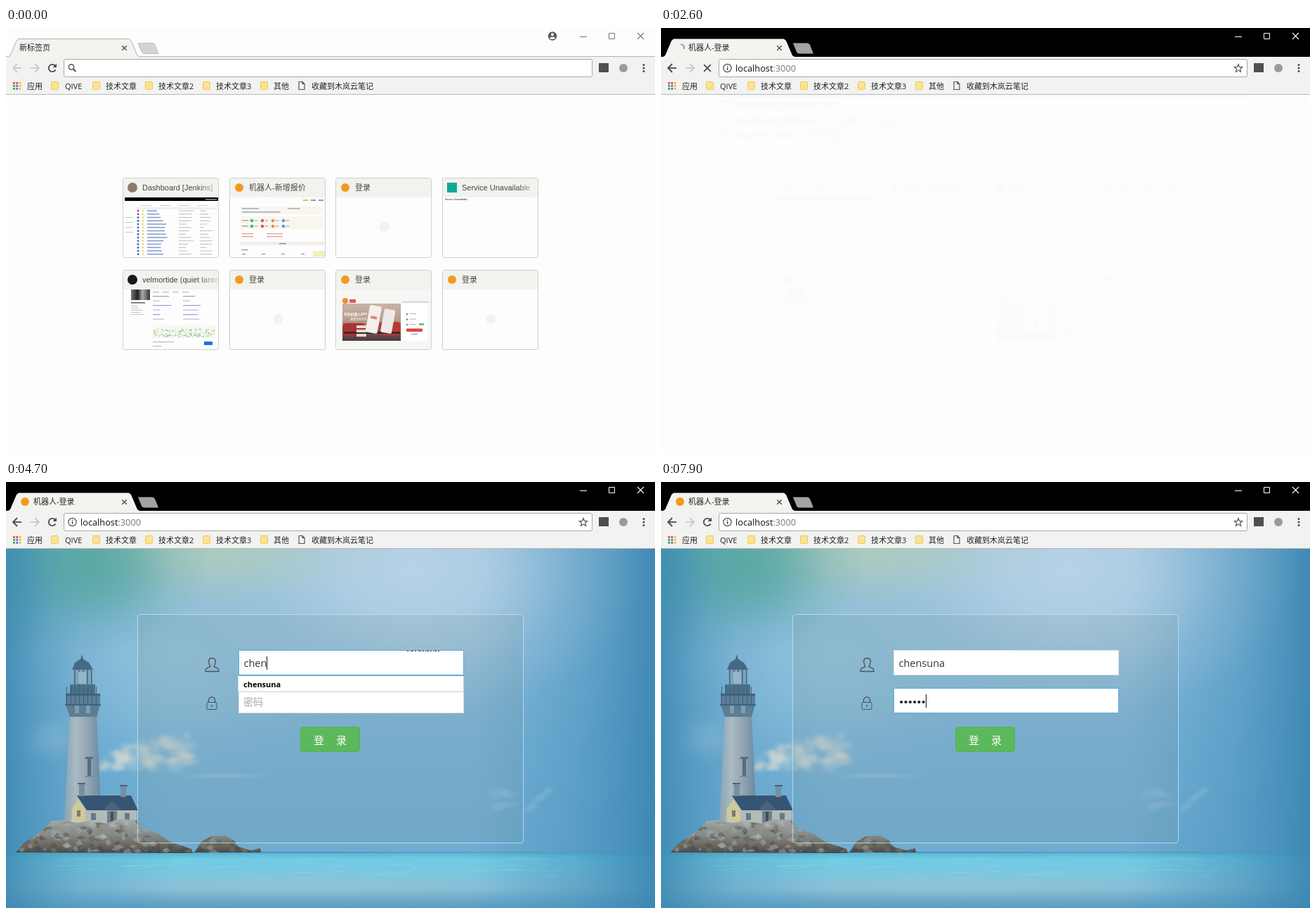
These frames come from a looping animation (924x606 px, 8000 ms). An HTML page with a canvas:

```html
<!DOCTYPE html>
<html lang="zh-CN">
<head>
<meta charset="utf-8">
<title>新标签页</title>
<style>
html, body { margin: 0; width: 100%; height: 100%; overflow: hidden; background: #fdfdfd; }
canvas { display: block; width: 924px; height: 606px; }
</style>
</head>
<body>
<canvas id="stage" width="924" height="606"></canvas>
<script>
const W = 924, H = 606, LOOP = 8000;
const stage = document.getElementById('stage').getContext('2d');
let c = stage;

const CJK = '"Noto Sans CJK SC","Noto Sans CJK JP","Noto Sans CJK",sans-serif';
const UI = '"Open Sans",' + CJK;
const ARIAL = '"Liberation Sans",Arial,' + CJK;
const USER = 'chensuna';

function rng(seed) {
  return () => (seed = (seed * 16807) % 2147483647) / 2147483647;
}
function rect(x, y, w, h, fill) { c.fillStyle = fill; c.fillRect(x, y, w, h); }
function box(x, y, w, h, r, fill, stroke) {
  c.beginPath(); c.roundRect(x, y, w, h, r);
  if (fill) { c.fillStyle = fill; c.fill(); }
  if (stroke) { c.strokeStyle = stroke; c.lineWidth = 1; c.stroke(); }
}
function disc(x, y, r, fill) {
  c.beginPath(); c.arc(x, y, r, 0, 7); c.fillStyle = fill; c.fill();
}
function trace(pts, close) {
  c.beginPath();
  for (let i = 0; i < pts.length; i += 2) c.lineTo(pts[i], pts[i + 1]);
  if (close) c.closePath();
}
function poly(fill, ...pts) { trace(pts, true); c.fillStyle = fill; c.fill(); }
function line(color, width, ...pts) {
  trace(pts); c.strokeStyle = color; c.lineWidth = width; c.stroke();
}
function arc(x, y, r, a, b, color, width) {
  c.beginPath(); c.arc(x, y, r, a, b); c.strokeStyle = color; c.lineWidth = width; c.stroke();
}
function text(s, x, y, size, color, family = UI, weight = '') {
  c.font = `${weight} ${size}px ${family}`;
  c.fillStyle = color;
  c.fillText(s, x, y);
  return x + c.measureText(s).width;
}
function fade(x0, y0, x1, y1, ...stops) {
  const g = c.createLinearGradient(x0, y0, x1, y1);
  for (let i = 0; i < stops.length; i += 2) g.addColorStop(stops[i], stops[i + 1]);
  return g;
}
function glow(x, y, rx, ry, rgb, a) {
  c.save(); c.translate(x, y); c.scale(rx, ry);
  const g = c.createRadialGradient(0, 0, 0, 0, 0, 1);
  g.addColorStop(0, `rgba(${rgb},${a})`);
  g.addColorStop(.3, `rgba(${rgb},${a * .8})`);
  g.addColorStop(.7, `rgba(${rgb},${a * .22})`);
  g.addColorStop(1, `rgba(${rgb},0)`);
  rect(-1, -1, 2, 2, g);
  c.restore();
}
function layer(paint) {
  const cv = document.createElement('canvas');
  cv.width = W; cv.height = H;
  c = cv.getContext('2d');
  paint();
  c = stage;
  return cv;
}

// ---- small icons ----
function magnifier(x, y, color) {
  arc(x - 1.5, y - 1.5, 3.7, 0, 7, color, 1.5);
  line(color, 2, x + 1.2, y + 1.2, x + 5, y + 5);
}
function sheet(x, y, color) {
  line(color, 1.2, x + 5, y, x, y, x, y + 11, x + 8, y + 11, x + 8, y + 3, x + 5, y, x + 5, y + 3, x + 8, y + 3);
}
function arrow(x, dir, color) {
  line(color, 1.8, x - 6 * dir, 57, x + 6 * dir, 57);
  line(color, 1.8, x, 51, x + 6 * dir, 57, x, 63);
}
function cross(x, y, r, color, w) {
  line(color, w, x - r, y - r, x + r, y + r);
  line(color, w, x - r, y + r, x + r, y - r);
}

// ---- new tab page ----
const tiles = [
  ['Dashboard [Jenkins]', '#8d7a6e', jobs],
  ['机器人-新增报价', '#f39a1e', quote],
  ['登录', '#f39a1e', blank],
  ['Service Unavailable', '#0fa99b', (x, y) => text('Service Unavailable', x + 4, y + 32, 3.4, '#555', ARIAL, 'bold')],
  ['velmortide (quiet lanterns)', '#16181c', profile],
  ['登录', '#f39a1e', blank],
  ['登录', '#f39a1e', advert],
  ['登录', '#f39a1e', blank]
];
function blank(x, y) { disc(x + 69.5, y + 70, 7, '#f2f2ee'); }
function jobs(x, y) {
  const r = rng(7);
  rect(x + 3, y + 28, 133, 5, '#000');
  rect(x + 118, y + 30, 16, 1.5, '#999');
  rect(x + 20, y + 42, 115, 3, '#eceff2');
  for (let i = 0; i < 4; i++) rect(x + 26 + i * 27, y + 39, 15, 1, '#c5ccd4');
  for (let i = 0; i < 14; i++) {
    const ly = y + 47 + i * 4.75;
    disc(x + 22, ly, 1.5, i ? '#4870b5' : '#d33');
    disc(x + 29, ly, 1.2, '#e8cf58');
    rect(x + 35, ly - .8, 14 + r() * 16, 1.6, '#8aa0cd');
    rect(x + 80, ly - .5, 8 + r() * 14, 1, '#bbb');
    rect(x + 110, ly - .5, 5 + r() * 14, 1, '#bbb');
  }
  for (let i = 0; i < 4; i++) rect(x + 4, y + 56 + i * 7, 11, 1, '#c8c8c8');
}
function quote(x, y) {
  const p = ['#3fb58c', '#e05a4a', '#eb8d3c', '#5b9bd5'];
  for (let i = 0; i < 3; i++) rect(x + 105 + i * 11, y + 31, 7, 2, i ? '#999' : '#e9b36a');
  rect(x + 15, y + 41, 118, 11, '#f8f6ee');
  rect(x + 18, y + 43, 24, 1.5, '#aaa'); rect(x + 83, y + 43, 18, 1.5, '#aaa');
  rect(x + 18, y + 48, 55, 1.5, '#9aa6d0');
  rect(x + 15, y + 55, 118, 18, '#f8f6ee');
  for (let j = 0; j < 2; j++) {
    rect(x + 18, y + 60 + j * 8, 9, 1.5, '#aaa');
    for (let i = 0; i < 4; i++) {
      disc(x + 32 + i * 15, y + 61 + j * 8, 2.3, p[i]);
      rect(x + 35.5 + i * 15, y + 60 + j * 8, 5, 1.5, '#bbb');
    }
  }
  for (let j = 0; j < 2; j++) {
    rect(x + 18, y + 79 + j * 4, 16, 1.3, '#dba47b');
    rect(x + 53, y + 79 + j * 4, 23, 1.3, '#e8a08a');
  }
  rect(x + 15, y + 91, 120, 5, '#f1efe6');
  rect(x + 71, y + 93, 10, 1.3, '#888');
  rect(x + 17, y + 102, 10, 1.3, '#999');
  for (let i = 0; i < 4; i++) rect(x + 18 + i * 28, y + 108, 5, 1.3, '#999');
  rect(x + 119, y + 104, 17, 8, '#f6eebb');
}
function profile(x, y) {
  const r = rng(31);
  rect(x + 12, y + 28, 27, 15, fade(x + 12, 0, x + 39, 0, 0, '#777', .35, '#222', .6, '#aaa', 1, '#333'));
  rect(x + 12, y + 46, 20, 1.6, '#666');
  for (let i = 0; i < 5; i++) rect(x + 12, y + 51 + i * 3, 10 + r() * 16, 1, '#c4c4c4');
  for (let i = 0; i < 4; i++) rect(x + 43 + i * 14, y + 31, 9, 1.2, '#bbb');
  for (let j = 0; j < 6; j++) for (let i = 0; i < 2; i++) {
    rect(x + 43 + i * 43, y + 37 + j * 6.5, 9 + r() * 18, 1.3, j % 2 ? '#c4c4c4' : '#91a9d6');
  }
  rect(x + 43, y + 79, 90, 18, '#f7f8f6');
  for (let i = 0; i < 46; i++) for (let j = 0; j < 7; j++) {
    const g = r();
    if (g > .6) rect(x + 44 + i * 1.9, y + 84 + j * 1.7, 1.5, 1.4, g > .85 ? '#79b864' : '#bfdcae');
  }
  rect(x + 43, y + 102, 30, 1.2, '#bbb');
  rect(x + 116, y + 102, 12, 5, '#1471dc');
  rect(x + 43, y + 108, 12, 1.2, '#bbb');
}
function advert(x, y) {
  rect(x + 2, y + 28, 134, 85, '#f6f6f4');
  disc(x + 14, y + 44, 4, '#f08c2a');
  rect(x + 20, y + 42, 9, 5, '#e25a4f');
  rect(x + 95, y + 45, 38, 1.2, '#b8c2d6');
  rect(x + 10, y + 48, 83, 53, fade(0, y + 48, 0, y + 101, 0, '#c9b3a5', .45, '#b99b8d', .75, '#7d5350', 1, '#4a3a3e'));
  box(x + 10, y + 76, 33, 18, 5, '#a93432');
  box(x + 62, y + 74, 31, 19, 5, '#b73a36');
  rect(x + 12, y + 88, 80, 3, '#3b2b30');
  c.save(); c.translate(x + 55, y + 69); c.rotate(.18); box(-9, -18, 17, 39, 2, '#f4efec');
  rect(-5, -3, 9, 4, '#e98079'); c.restore();
  c.save(); c.translate(x + 75, y + 72); c.rotate(.18); box(-8, -16, 16, 34, 2, '#efe9e7'); c.restore();
  text('车险机器人APP', x + 12, y + 65, 4.8, '#fff', CJK, 'bold');
  text('智能车险平台', x + 21, y + 72, 4, '#fff', CJK);
  for (let i = 0; i < 3; i++) rect(x + 30, y + 79 + i * 6, 14, 4, '#e9d8d5');
  rect(x + 94, y + 48, 37, 53, '#fff');
  for (let i = 0; i < 3; i++) {
    disc(x + 102, y + 63 + i * 7.5, 1.6, '#8a9bb8');
    rect(x + 106, y + 62 + i * 7.5, 9, 1.2, '#bbb');
  }
  rect(x + 119, y + 76, 7, 3, '#8ab39a');
  box(x + 101, y + 83.5, 23, 4.5, 1, '#e0453f');
  rect(x + 108, y + 91, 9, 1.2, '#8b9bd0');
}
const newTab = layer(() => {
  rect(0, 0, W, H, '#fdfdfd');
  tiles.forEach(([name, color, thumb], i) => {
    const x = Math.round(166 + (i % 4) * 151.6), y = i < 4 ? 213 : 344;
    box(x + .5, y + .5, 136, 113, 2, '#fdfdfd', '#cfcfcb');
    rect(x + 1, y + 1, 135, 27, '#f2f2ee');
    c.save();
    c.beginPath(); c.rect(x + 1, y + 1, 135, 112); c.clip();
    if (color === '#0fa99b') rect(x + 7, y + 7, 14, 14, color);
    else disc(x + 14, y + 14, color === '#f39a1e' ? 6 : 7, color);
    const ink = fade(x + 106, 0, x + 136, 0, 0, '#444', 1, 'rgba(68,68,68,.15)');
    text(name, x + 28, y + 18, 11, ink, ARIAL);
    thumb(x, y);
    c.restore();
  });
});

function suggestions() {
  const s = 12.75, blue = '#1c55c9', grey = '#777', host = 'localhost:3000';
  rect(0, 73, W, 94, '#fff');
  rect(0, 166, W, 1, '#dcdcdc');
  box(82, 77, 753, 21, 2, '#0078d7');
  sheet(91, 82.5, '#fff');
  text(host, 106, 92.5, s, '#fff', UI, 'bold');
  text('-', 202, 92.5, s, '#8fc6f5');
  text('机器人-登录', 211, 92.5, s, '#8fc6f5');
  sheet(91, 103.5, '#555');
  text('/Home#', text(host, 106, 114, s, blue, UI, 'bold'), 114, s, blue);
  sheet(91, 125, '#555');
  text('/Home', text(host, 106, 135.5, s, blue, UI, 'bold'), 135.5, s, blue);
  text('-', 244, 135.5, s, grey);
  text('机器人车险系统', 253, 135.5, s, grey);
  magnifier(94.5, 152, '#555');
  text(host, 106, 157, s, '#111');
  text('-', 197, 157, s, grey);
  text('青杉 搜索', 206, 157, s, grey);
}

// ---- login page ----
function sky(r) {
  rect(0, 95, W, 432, fade(0, 95, 0, 527, 0, '#8dbbd8', .35, '#8abbdb', .65, '#78b2d7', 1, '#6facd2'));
  rect(0, 527, W, 79, fade(0, 527, 0, 606, 0, '#58b4d4', .12, '#6fcce3', .4, '#7cc6dd', .65, '#86bdd4', 1, '#5a9cc4'));
  rect(0, 95, W, 511, fade(0, 0, W, 0, 0, 'rgba(58,136,176,.85)', .12, 'rgba(80,152,192,.35)', .26, 'rgba(80,152,192,0)',
    .72, 'rgba(66,142,186,0)', .88, 'rgba(66,142,186,.5)', 1, 'rgba(56,132,176,.9)'));
  c.save(); c.beginPath(); c.rect(0, 95, W, 432); c.clip();
  glow(580, 125, 330, 210, '200,220,236', .7);
  glow(235, 260, 230, 170, '155,202,222', .45);
  glow(290, 90, 260, 110, '185,208,180', .7);
  glow(120, 115, 170, 130, '76,164,150', .75);
  glow(0, 120, 80, 150, '62,142,176', .6);
  glow(65, 365, 50, 40, '175,205,225', .25);

  // clouds
  for (let i = 0; i < 75; i++) {
    const u = r(), top = 14 + 40 * u * (1.6 - u * .75);
    glow(138 + u * 126, 408 - r() * top, 8 + r() * 11, 6 + r() * 8, '216,220,212', .3);
  }
  glow(310, 418, 75, 5, '200,216,224', .3);
  for (let i = 0; i < 12; i++) glow(690 + r() * 35, 437 + r() * 38, 14, 8, '175,206,227', .16);
  for (let i = 0; i < 9; i++) glow(743 + i * 4, 464 - i * 4 + r() * 6, 9, 7, '175,206,227', .16);
  c.restore();

  // horizon and ripples
  rect(0, 526, W, 1.5, fade(0, 0, W, 0, 0, 'rgba(40,95,130,0)', .15, 'rgba(40,95,130,.65)', .6, 'rgba(50,110,150,.4)', 1, 'rgba(50,110,150,0)'));
  for (let i = 0; i < 60; i++) rect(60 + r() * 740, 530 + r() * 32, 12 + r() * 40, 1, 'rgba(190,240,245,.14)');
  glow(420, 575, 330, 22, '165,205,215', .35);
}
function lighthouse() {
  poly(fade(84, 0, 136, 0, 0, '#8aa5b5', .3, '#a9bac2', .6, '#93a8b5', 1, '#69879b'), 91, 330, 129, 330, 136, 484, 83, 484);
  poly('#476985', 94, 267, 98, 257, 106, 252, 108, 245, 110, 252, 118, 257, 124, 267);
  rect(96, 267, 26, 22, '#7aa3bb');
  for (let x = 97; x < 123; x += 6) rect(x, 267, 1.5, 22, '#416680');
  rect(103, 270, 11, 17, '#94b6c8');
  rect(91, 288, 36, 14, '#4d6f87');
  rect(85, 301, 49, 3, '#3d627d');
  poly('#5b7d95', 85, 304, 134, 304, 134, 317, 129, 334, 91, 334, 85, 317);
  for (let x = 86; x < 134; x += 6) rect(x, 291, 1, 27, '#3d627d');
  rect(84, 316, 51, 2, '#3d627d');
  rect(98, 318, 6, 11, '#829daf'); rect(114, 318, 6, 11, '#829daf');
  rect(113, 391, 11, 3, '#596f7f'); rect(116, 394, 5, 25, '#586d7b'); rect(112, 418, 13, 2, '#7b8e9b');

  // house
  poly('#b2bbb6', 93, 484, 93, 464, 103, 450, 115, 466, 186, 466, 186, 487);
  poly('#d0c99c', 94, 484, 94, 465, 103, 452, 113, 467, 113, 486);
  poly('#365473', 101, 446, 178, 446, 188, 467, 115, 467);
  rect(104, 428, 8, 19, '#7590a3'); rect(163, 432, 8, 16, '#7590a3');
  rect(102, 428, 11, 2, '#4a6478'); rect(162, 431, 11, 2, '#4a6478');
  poly('#4c6379', 139, 466, 151, 453, 164, 466);
  rect(144, 468, 14, 18, '#6f7f86'); rect(149, 469, 4, 16, '#3c5261');
  rect(121, 471, 7, 10, '#667987'); rect(169, 471, 7, 10, '#667987');
  rect(101, 467, 5, 9, '#7d7b68');
}
function rock(r, x0, x1, n, ...pts) {
  c.save();
  poly(fade(0, 480, 0, 528, 0, '#a0a9aa', .45, '#878a86', .8, '#68635a', 1, '#3f494d'), ...pts);
  c.clip();
  for (let i = 0; i < n; i++) {
    const x = x0 + r() * (x1 - x0), y = 482 + r() * 44, w = 4 + r() * 12, h = 2 + r() * 3;
    poly(['rgba(180,188,186,.4)', 'rgba(58,66,70,.38)', 'rgba(140,130,112,.3)'][i % 3],
      x, y, x + w * .6, y - h, x + w, y + h * .3, x + w * .5, y + h);
  }
  c.restore();
}
const scene = layer(() => {
  const r = rng(99);
  sky(r);
  lighthouse();
  rock(r, 15, 255, 190, 14, 527, 25, 514, 42, 503, 56, 492, 64, 482, 83, 481, 96, 486, 117, 482, 142, 486, 158, 480, 186, 480,
    194, 493, 216, 500, 234, 512, 264, 522, 266, 528);
  rock(r, 268, 355, 60, 268, 527, 278, 512, 292, 504, 312, 503, 325, 510, 331, 519, 349, 524, 362, 521, 363, 527);

  box(187.5, 188.5, 549, 325, 4, 'rgba(120,140,145,.17)', 'rgba(195,228,242,.8)');
  box(419.5, 348.5, 84, 35, 4, '#5cb85c', '#54b054');
  text('登', 438, 372.5, 15, '#fff', CJK);
  text('录', 470, 372.5, 15, '#fff', CJK);
});

function userIcon(x, y, color) {
  c.beginPath();
  c.moveTo(x + 7, y + 12);
  c.bezierCurveTo(x + 2, y + 3, x + 6, y, x + 9.5, y);
  c.bezierCurveTo(x + 13, y, x + 17, y + 3, x + 12, y + 12);
  c.bezierCurveTo(x + 16, y + 14, x + 19, y + 14, x + 19, y + 19);
  c.lineTo(x, y + 19);
  c.bezierCurveTo(x, y + 14, x + 3, y + 14, x + 7, y + 12);
  c.strokeStyle = color; c.lineWidth = 1.4; c.stroke();
}
function lockIcon(x, y, color) {
  box(x + .5, y + 7.5, 14, 10, 1, null, color);
  c.beginPath(); c.moveTo(x + 3, y + 7); c.lineTo(x + 3, y + 4);
  c.arc(x + 7.5, y + 4.5, 4.5, Math.PI, 0); c.lineTo(x + 12, y + 7);
  c.lineWidth = 1.4; c.stroke();
  rect(x + 6.8, y + 11, 1.5, 3, color);
}
function field(x, y, focus) {
  const mix = (a, b) => Math.round(a + (b - a) * focus);
  box(x + .5, y + .5, 320, 35, 0, '#fff', `rgb(${mix(214, 96)},${mix(222, 172)},${mix(228, 216)})`);
}
function caret(x, y) { rect(Math.round(x), y, 1, 19, '#111'); }
const ramp = (t, a, b) => Math.max(0, Math.min(1, (t - a) / (b - a)));

// times at which each character of the name and the password appears
const nameKeys = [4400, 4500, 4600, 4700, 4900, 5200, 5300, 5400];
const passKeys = [7000, 7100, 7300, 7500, 7700, 7900];
const typed = (keys, t) => keys.filter(k => k <= t).length;

function login(t) {
  c.drawImage(scene, 0, 0);
  const k = ramp(t, 2700, 2900), x = Math.round(322 + 9 * k), ink = k < 1 ? '#23284a' : '#4c565f';
  userIcon(292 - 8 * k, 249 + 1.5 * k, ink);
  lockIcon(294 - 8.5 * k, 304 + 2 * k, ink);
  field(x, 239, ramp(t, 3400, 3700) * (1 - ramp(t, 6100, 6400)));
  field(x, 293, ramp(t, 6100, 6400));
  if (t < 6200) {
    c.setLineDash([2, 2, 1, 1, 3, 2]);
    line('#444', 1, 571, 240.5, 618, 240.5);
    c.setLineDash([]);
  }
  const n = typed(nameKeys, t), p = typed(passKeys, t), tx = x + 7.5;
  if (n) {
    const end = text(USER.slice(0, n), tx, 263, 14.5, '#333');
    if (t < 5900) caret(end, 248);
  } else {
    text('用户名', tx - .5, 263, 14, '#aaa', CJK);
    if (t >= 3500 && t < 4200) caret(339, 248);
  }
  if (p) {
    for (let i = 0; i < p; i++) disc(342.2 + 6.3 * i, 313, 2.1, '#222');
    caret(339 + 6.3 * p, 302);
  } else {
    text('密码', tx - .5, 317.5, 14, '#aaa', CJK);
    if (t >= 6300) caret(339, 302);
  }
  if (n && t < 6200) {
    box(330.5, 275.5, 321, 23, 0, '#fff', '#c8d0d6');
    rect(331, 275, 321, 1, '#60acd8');
    text(USER, 338, 291.5, 11, '#000', UI, 'bold');
  }
}

// ---- browser frame ----
function bookmarks() {
  rect(0, 72, W, 23, '#f2f2f0');
  rect(0, 94, W, 1, '#b9b9b7');
  const dots = ['#e8453c', '#e8453c', '#f9bb2d', '#34a853', '#3f7de8', '#f9bb2d', '#34a853', '#3f7de8', '#f9bb2d'];
  dots.forEach((d, i) => rect(10 + (i % 3) * 4.3, 77 + (i / 3 | 0) * 4, 2.8, 2.8, d));
  text('应用', 30, 86.5, 11, '#222');
  [[64, 84, 'QIVE'], [123, 142, '技术文章'], [198, 217, '技术文章2'], [280, 299, '技术文章3'], [362, 381, '其他']].forEach(([x, tx, s]) => {
    box(x + .5, 76.5, 10, 11, 1, '#fde293', '#ecc95c');
    text(s, tx, 86.5, 11, '#222');
  });
  sheet(417, 76.5, '#555');
  text('收藏到木岚云笔记', 435, 86.5, 11, '#222');
}
function frameBar(t) {
  const active = t >= 700, loading = t >= 2300 && t < 2700, page = t >= 2300;
  const ctl = active ? '#fff' : '#777';
  rect(0, 0, W, 41, active ? '#000' : '#fdfdfd');
  rect(0, 40, W, 1, active ? '#000' : '#b5b5b3');
  if (!active) {
    disc(778, 11.5, 6.2, '#55575c');
    disc(778, 9.3, 2, '#fdfdfd');
    box(774.5, 12.7, 7, 3, 1.5, '#fdfdfd');
  }
  line(ctl, 1, 817, 12.5, 827, 12.5);
  box(858.5, 7.5, 8, 8, 0, null, ctl);
  cross(903.5, 11.5, 4.5, ctl, 1.1);

  trace([3, 41, 6, 39, 15, 18, 18, 15.5, 175, 15.5, 178, 18, 187, 39, 190, 41]);
  c.fillStyle = '#f3f3ef'; c.fill();
  if (!active) { c.strokeStyle = '#b0b0ae'; c.lineWidth = 1; c.stroke(); }
  c.beginPath(); c.moveTo(188, 21.5); c.lineTo(208, 21.5); c.quadraticCurveTo(211, 21.5, 212, 24);
  c.lineTo(217, 36.5); c.lineTo(197, 36.5); c.quadraticCurveTo(194, 36.5, 193, 34); c.closePath();
  c.fillStyle = active ? '#a3a3a1' : '#d4d4d2'; c.fill();
  if (!active) { c.strokeStyle = '#c0c0be'; c.stroke(); }
  if (loading) {
    const a = (t - 2600) / 100 * .9;
    arc(28, 28, 4.8, a - 1.5, a + .4, '#5b7fd0', 1.6);
  } else if (page) disc(27, 28, 6, '#f39a1e');
  text(t < 2500 ? '新标签页' : '机器人-登录', page ? 39 : 19, 32, 11, '#222');
  cross(168.5, 28.5, 3.3, '#555', 1.5);

  rect(0, 41, W, 31, '#f2f2f0');
  arrow(16, -1, page ? '#4a4a4a' : '#c9c9c7');
  arrow(41, 1, '#c9c9c7');
  if (loading) cross(66, 57, 4.8, '#4a4a4a', 1.8);
  else {
    arc(66, 57, 5.2, .5, 5.5, '#4a4a4a', 1.8);
    poly('#4a4a4a', 72, 50.5, 72, 56, 66.5, 56);
  }
  box(82.5, 44.5, 752, 25, 2, '#fff', '#a8a8a6');
  if (t < 1500) {
    magnifier(94.5, 57, '#555');
    if (active && t < 1200) rect(106, 48, 1, 16, '#111');
  } else {
    if (page) {
      arc(94.5, 57, 5.6, 0, 7, '#4a4a4a', 1.2);
      rect(93.8, 56, 1.5, 4, '#4a4a4a'); rect(93.8, 53.6, 1.5, 1.5, '#4a4a4a');
    } else sheet(91, 51.5, '#555');
    text(':3000', text('localhost', 106, 61.5, 12.75, '#111'), 61.5, 12.75, '#777');
    if (t < 2000) rect(193, 48, 1, 16, '#111');
  }
  if (page) {
    const pts = [];
    for (let i = 0; i < 10; i++) {
      const a = i * Math.PI / 5 - Math.PI / 2, r = i % 2 ? 2.6 : 6;
      pts.push(822 + r * Math.cos(a), 57.5 + r * Math.sin(a));
    }
    trace(pts, true); c.strokeStyle = '#555'; c.lineWidth = 1.2; c.stroke();
  }
  rect(844, 50, 14, 13, '#4b5052');
  disc(879, 57, 6, '#9b9b99');
  for (let i = -1; i < 2; i++) disc(908, 57 + i * 4.6, 1.5, '#4a4a4a');
}

function draw(t) {
  const popup = t >= 1500 && t < 2300;
  if (t < 2700) {
    c.drawImage(newTab, 0, 0);
    if (popup) suggestions();
    if (t >= 2500) {
      rect(0, 73, W, H, 'rgba(253,253,253,.985)');
      c.globalAlpha = .03;
      suggestions();
      c.globalAlpha = 1;
    }
  } else login(t);
  frameBar(t);
  if (popup) rect(0, 72, W, 1, '#cfcfcd');
  else bookmarks();
}

const start = performance.now();
function tick() {
  const t = (performance.now() - start) % LOOP;
  draw(Math.floor(t / 100) * 100);
  requestAnimationFrame(tick);
}
tick();
</script>
</body>
</html>
```
